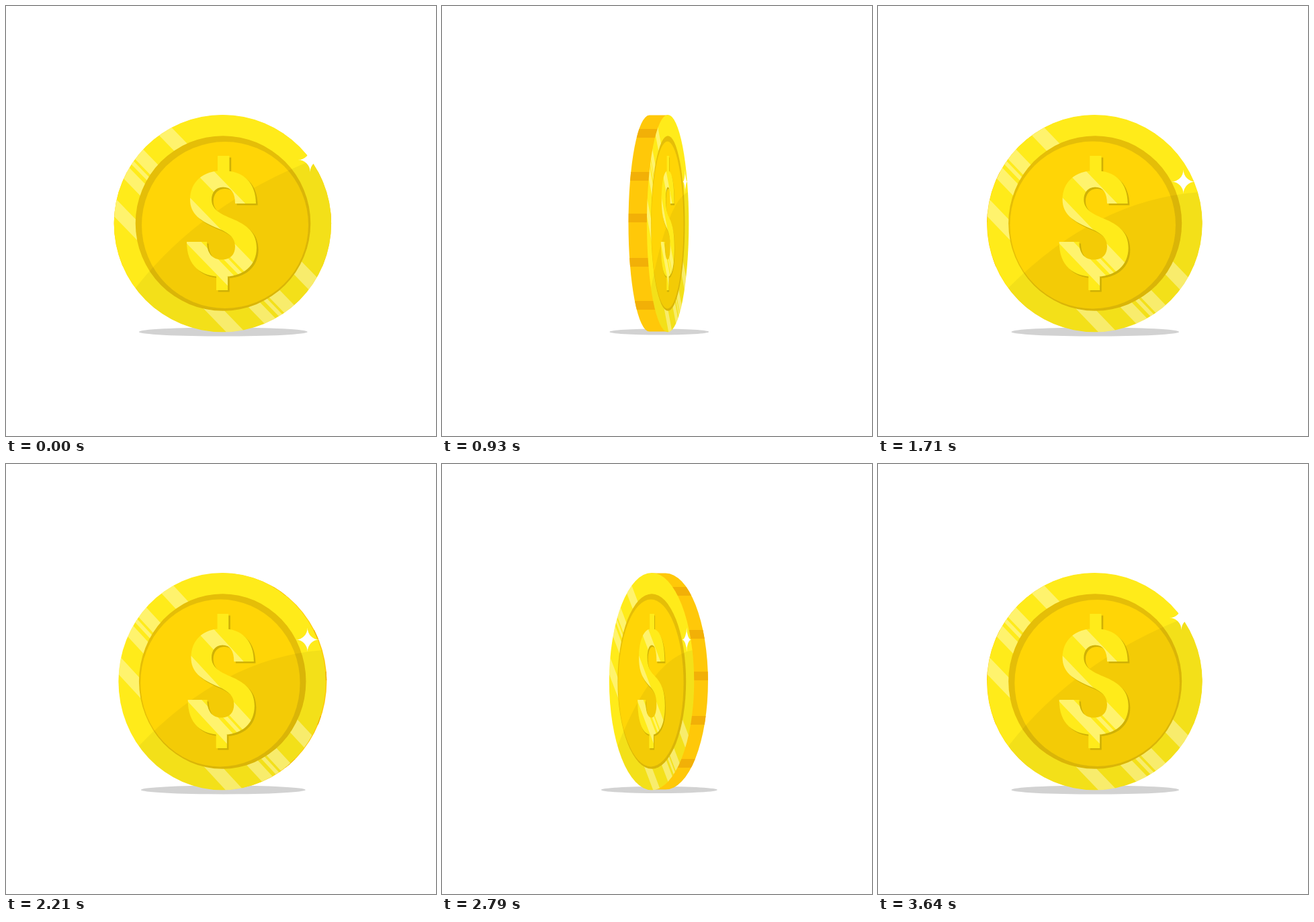
Animation, 640 px wide and 640 px high, one loop 3710 ms. Source, as an HTML page with a canvas:

```html
<!DOCTYPE html>
<html lang="en">
<head>
<meta charset="utf-8">
<title>Spinning coin</title>
<style>
  html, body { margin: 0; width: 100%; height: 100%; overflow: hidden; background: #fff; }
  canvas { display: block; width: 640px; height: 640px; }
</style>
</head>
<body>
<canvas id="stage"></canvas>
<script>
const LOOP = 3710, STEPS = 52;
const CX = 322.4, CY = 323.6, R = 161.7, THICK = 34;

const canvas = document.getElementById('stage');
const dpr = window.devicePixelRatio || 1;
canvas.width = canvas.height = 640 * dpr;
const ctx = canvas.getContext('2d');

// Turn of the coin: [step, degrees]
const TURN = [
  [-1, -8], [0, 0], [8, 48], [12, 90], [16, 134], [18, 147.4], [24, 172],
  [31, 197.5], [32, 202], [39, 247], [45, 318], [48, 338], [51, 352],
  [52, 360], [60, 408]
];

function slope(i) {
  const a = TURN[i - 1], b = TURN[i + 1];
  return (b[1] - a[1]) / (b[0] - a[0]);
}

// Cubic Hermite through the table
function angleAt(step) {
  let i = 1;
  while (TURN[i + 1][0] <= step) i++;
  const [x0, y0] = TURN[i], [x1, y1] = TURN[i + 1];
  const h = x1 - x0, u = (step - x0) / h, v = 1 - u;
  const deg = v * v * (1 + 2 * u) * y0 + u * u * (3 - 2 * u) * y1
    + h * u * v * (v * slope(i) - u * slope(i + 1));
  return deg * Math.PI / 180;
}

function disc(x, y, rx, ry = rx) {
  const p = new Path2D();
  p.ellipse(x, y, rx, ry, 0, 0, Math.PI * 2);
  return p;
}

function fill(path, color) {
  ctx.fillStyle = color;
  ctx.fill(path);
}

const face = disc(CX, CY, R);
const ring = disc(323, 323.5, 130.3);

const dollar = new Path2D(
  'M372 294H341C341 278 335 269.500 323 269.500C312 269.500 306 278 306 288' +
  'C306 302 318 309 335 316C360 326 373 338 373 360C373 386 354 403 322 403' +
  'C290 403 269 387 269 351H299C299 368 307 377.500 321 377.500' +
  'C334 377.500 341 370 341 358C341 345 333 339 318 332' +
  'C288 320 274 309 274 288C274 262 293 245 323 245C354 245 372 264 372 294Z' +
  'M315 223H332.500V250H315ZM313 398H330V423H313Z');

const rim = new Path2D();
rim.addPath(face);
rim.addPath(ring);

// Diagonal glints, as ranges of x - y
const glints = new Path2D();
for (const [hi, lo] of [[65, 35], [-9, -35], [-40, -48], [-56, -80], [-121, -149]]) {
  glints.moveTo(103 + hi, 100);
  glints.lineTo(497 + hi, 506);
  glints.lineTo(497 + lo, 506);
  glints.lineTo(103 + lo, 100);
  glints.closePath();
}

const SIDES = [
  {
    inner: disc(326, 326, 124),
    shade: new Path2D('M460 228Q293 293 194 418L130 560H560V228Z'),
    star: [452.7, 229]
  },
  {
    inner: disc(319.5, 326, 124.5),
    shade: new Path2D('M480 277Q325 288 193 419L130 560H560V277Z'),
    star: [455.7, 261.5]
  }
];

function starPath([x, y], r = 18) {
  const p = new Path2D();
  const q = Math.PI / 2;
  p.arc(x - r, y - r, r, q, 0, true);
  p.arc(x + r, y - r, r, 2 * q, q, true);
  p.arc(x + r, y + r, r, 3 * q, 2 * q, true);
  p.arc(x - r, y + r, r, 4 * q, 3 * q, true);
  p.closePath();
  return p;
}

function clipped(path, rule, draw) {
  ctx.save();
  ctx.clip(path, rule);
  draw();
  ctx.restore();
}

function drawShine() {
  fill(glints, 'rgba(255,255,255,.36)');
}

function drawFace(side) {
  fill(face, '#ffeb1a');
  fill(ring, '#e5be08');
  fill(side.inner, '#ffd506');
  clipped(face, 'nonzero', () => fill(side.shade, 'rgba(0,0,0,.048)'));

  ctx.save();
  ctx.translate(2.7, 2.4);
  fill(dollar, '#cfb106');
  ctx.restore();
  fill(dollar, '#ffeb1a');

  clipped(rim, 'evenodd', drawShine);
  clipped(dollar, 'nonzero', drawShine);
  fill(starPath(side.star), '#fff');
}

function drawEdge(front, back, rx) {
  const ry = R - 0.7;
  const body = disc(back, CY, rx, ry);
  body.rect(Math.min(front, back), CY - ry, Math.abs(front - back), 2 * ry);
  fill(body, '#ffc809');
  clipped(body, 'nonzero', () => {
    ctx.fillStyle = '#f2b007';
    for (const y of [183, 247, 309, 375, 439]) {
      ctx.fillRect(Math.min(front, back) - rx, y, 2 * rx + THICK, 13);
    }
  });
}

function draw(angle) {
  const c = Math.cos(angle), s = Math.sin(angle);
  const p = Math.abs(c);
  const shift = THICK * (1 - p) / 2 * (c * s > 0 ? 1 : -1);

  ctx.setTransform(dpr, 0, 0, dpr, 0, 0);
  ctx.fillStyle = '#fff';
  ctx.fillRect(0, 0, 640, 640);

  fill(disc(323.3, 485, 61.5 + 64 * p, 4 + 2.6 * p), '#d2d2d2');
  drawEdge(CX - shift, CX + shift, R * p);
  if (p < 0.005) return;
  ctx.translate(CX - shift, 0);
  ctx.scale(p, 1);
  ctx.translate(-CX, 0);
  drawFace(SIDES[c >= 0 ? 0 : 1]);
}

const start = performance.now();
function tick() {
  const t = (performance.now() - start) % LOOP;
  const step = Math.floor((t + 5) / LOOP * STEPS) % STEPS;
  draw(angleAt(step));
  requestAnimationFrame(tick);
}
tick();
</script>
</body>
</html>
```
